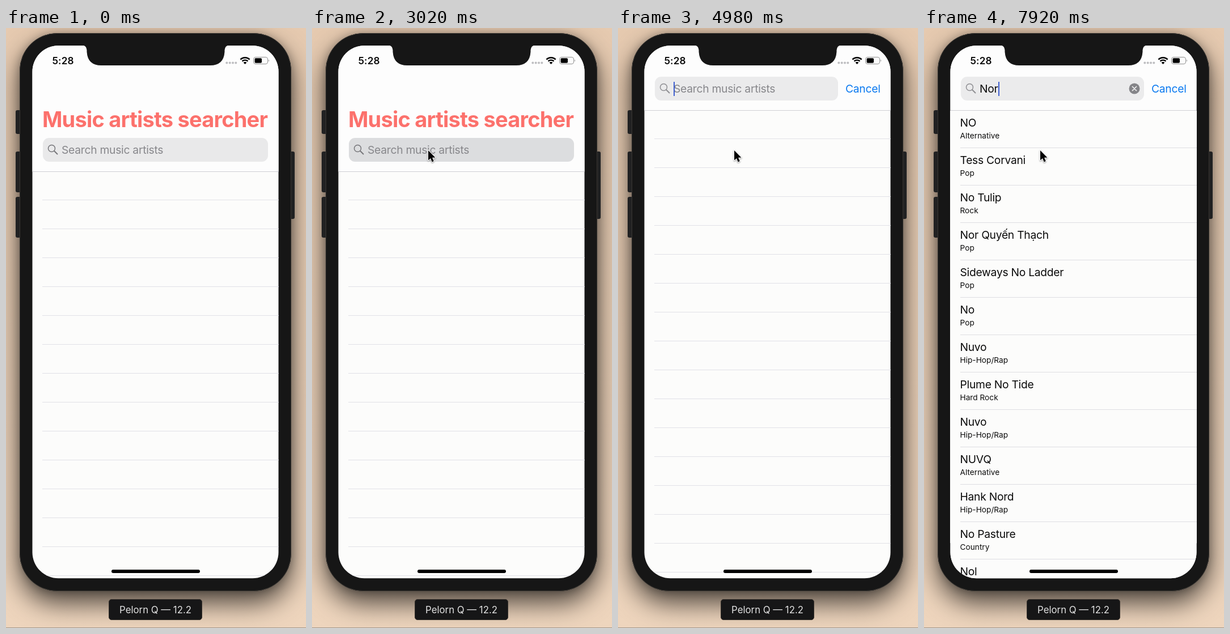
Write an HTML page that moves like this. It is 529 by 1059 pixels and loops after 8 s.

```html
<!DOCTYPE html>
<html lang="en">
<head>
<meta charset="utf-8">
<title>Music artists searcher</title>
<style>
  html, body { margin: 0; width: 100%; height: 100%; overflow: hidden; }
  body {
    position: relative;
    background: linear-gradient(#e6cab0, #eed5bd);
    font-family: Inter, "Noto Sans", sans-serif;
    font-optical-sizing: none;
    color: #0b0b0b;
  }
  div, svg { position: absolute; box-sizing: border-box; }
  .stage { inset: 0 auto auto 0; width: 529px; height: 1059px; overflow: hidden; }
  .text { white-space: nowrap; font-size: 19.3px; letter-spacing: -.28px; line-height: 26px; }

  /* device */
  .body {
    left: 24px; top: 9px; width: 479px; height: 985px; border-radius: 66px;
    background: #161616; border: 1px solid #3a3733;
  }
  .shadow { box-shadow: 0 21px 46px rgba(0, 0, 0, .68), 0 0 15px rgba(0, 0, 0, .24); }
  .key { left: 17px; width: 10px; background: #212122; border-radius: 3px; }
  .key.right { left: 499px; }
  .pop { box-shadow: 5px 0 #212122; animation: pop 8s linear infinite; }
  .screen {
    left: 46px; top: 31px; width: 435px; height: 941px;
    overflow: hidden; background: #fcfcfb;
    clip-path: inset(0 .5px .7px round 46px);
  }
  .view { left: -46px; top: -31px; width: 529px; height: 1059px; }
  .home { left: 186px; top: 956px; width: 156px; height: 6px; border-radius: 3px; background: #000; }
  .clock { left: 81.5px; top: 44.5px; font-size: 17.2px; font-weight: 600; letter-spacing: .1px; }
  .label {
    left: 181px; top: 1008px; width: 165px; height: 37px; border-radius: 5px;
    background: #161617; border: 1px solid #39342f; color: #e2e2e2;
    font-size: 16.8px; line-height: 36px; letter-spacing: 0; text-align: center;
  }
  .floor { left: 0; top: 1058px; width: 529px; height: 1px; background: #a3978a; }

  /* lists */
  .lines {
    left: 64px; top: 303px; width: 420px; height: 820px;
    background: repeating-linear-gradient(#e1e1e7 0 1px, transparent 1px 51px);
    animation: jump 8s step-end infinite;
  }
  .list { left: 46px; top: 146px; width: 435px; height: 830px; background: #fcfcfb; visibility: hidden; }
  .row { left: 18px; width: 420px; height: 66px; border-bottom: 1px solid #dedee2; }
  .row .text { left: -.5px; top: 8px; }
  .row .genre { top: 31px; font-size: 13.7px; letter-spacing: 0; }

  /* header */
  .header {
    left: 46px; top: 31px; width: 435px; height: 223px;
    background: #fdfdfd; border-bottom: 1px solid #cfcfd4;
    animation: rise 8s linear infinite;
  }
  .title {
    left: 18px; top: 105px; line-height: 50px; font-size: 38px; font-weight: 700;
    letter-spacing: -.8px; color: #fc716c; animation: title 8s linear infinite;
  }
  .field {
    left: 19px; top: 163px; width: 397px; height: 42px; border-radius: 11px;
    background: #e9e9ea; animation: field 8s linear infinite;
  }
  .field .text { left: 33px; top: 8px; }
  .lens { animation: lens 8s linear infinite; }
  .hint { color: #87878b; animation: hint 8s linear infinite; }
  .query { display: flex; align-items: center; height: 26px; visibility: hidden; }
  .query i { width: 2px; height: 25px; background: #3f5fd0; }
  .clear { right: 7px; top: 11px; visibility: hidden; animation: clear 8s step-end infinite; }
  .cancel { left: 355px; top: 171px; color: #0a79f0; animation: cancel 8s linear infinite; }

  .cursor {
    left: 0; top: 0; overflow: visible;
    filter: drop-shadow(0 1px 1.2px rgba(0, 0, 0, .4));
    animation: cursor 8s linear infinite;
  }

  @keyframes cursor {
    0%, 17% { transform: translate(-20px, 352px); animation-timing-function: cubic-bezier(.3, .4, .6, 1); }
    20% { transform: translate(192px, 239px); animation-timing-function: ease-out; }
    26.25%, 100% { transform: translate(205px, 216px); }
  }
  @keyframes pop {
    0%, 17.4% { transform: none; }
    18.2%, 21.4% { transform: translateX(-5px); }
    22.5%, 100% { transform: none; }
  }
  @keyframes jump { 39.44%, 100% { transform: translateY(-108px); } }
  @keyframes rise {
    0%, 39.44% { transform: none; animation-timing-function: ease-in-out; }
    43.81%, 100% { transform: translateY(-108px); }
  }
  @keyframes title {
    0%, 39.44% { transform: none; animation-timing-function: ease-in-out; }
    43.81%, 100% { transform: translateY(-50px); }
    0%, 41.25% { opacity: 1; }
    42.9%, 100% { opacity: 0; }
  }
  @keyframes field {
    0%, 29% { background-color: #e9e9ea; }
    30.6%, 41.3% { background-color: #dcdddf; }
    45%, 100% { background-color: #ebebec; }
    0%, 39.44% { width: 397px; animation-timing-function: ease-in-out; }
    43.81%, 100% { width: 323px; }
  }
  @keyframes lens {
    0%, 39.44% { stroke: #76767a; }
    41.25%, 100% { stroke: #8e8e92; }
  }
  @keyframes hint {
    0%, 39.44% { opacity: 1; }
    41.25% { opacity: .7; }
    43.81%, 73.74% { opacity: 1; }
    73.75%, 100% { opacity: 0; }
  }
  @keyframes cancel {
    0%, 39.44% { transform: translateX(75px); opacity: 0; animation-timing-function: ease-in-out; }
    43.81%, 100% { transform: none; opacity: 1; }
  }
  @keyframes clear { 73.75%, 100% { visibility: visible; } }
  @keyframes blink {
    0%, 46.25%, 57%, 67.75%, 73.75%, 100% { visibility: hidden; }
    40%, 50.75%, 61.5%, 72.25% { visibility: visible; }
  }
  @keyframes one { 73.75% { visibility: visible; } 88.75%, 100% { visibility: hidden; } }
  @keyframes two { 88.75% { visibility: visible; } 96.25%, 100% { visibility: hidden; } }
  @keyframes three { 96.25%, 100% { visibility: visible; } }
  @keyframes first { 78.75% { visibility: visible; } 93.75%, 100% { visibility: hidden; } }
  @keyframes second { 93.75%, 100% { visibility: visible; } }
</style>
</head>
<body>
<div class="stage">
  <div class="body shadow"></div>
  <div class="key" style="top:145px;height:42px"></div>
  <div class="key" style="top:218px;height:72px"></div>
  <div class="key pop" style="top:298px;height:72px"></div>
  <div class="key right" style="top:218px;height:119px"></div>
  <div class="body"></div>

  <div class="screen"><div class="view">
    <div class="lines"></div>
    <div class="list" id="first" style="animation:first 8s step-end infinite"></div>
    <div class="list" id="second" style="animation:second 8s step-end infinite"></div>
    <div class="header">
      <div class="text title">Music artists searcher</div>
      <div class="field">
        <svg class="lens" width="30" height="42" fill="none" stroke-width="1.5" stroke-linecap="round">
          <circle cx="15.5" cy="18.5" r="6"/><path d="M20 23l5.5 5.5" stroke-width="1.9"/>
        </svg>
        <div class="text hint">Search music artists</div>
        <div class="text query" style="animation:blink 8s step-end infinite"><i></i></div>
        <div class="text query" style="animation:one 8s step-end infinite">N<i></i></div>
        <div class="text query" style="animation:two 8s step-end infinite">No<i></i></div>
        <div class="text query" style="animation:three 8s step-end infinite">Nor<i></i></div>
        <svg class="clear" width="20" height="20">
          <circle cx="10" cy="10" r="9.5" fill="#848488"/>
          <path d="M6.5 6.5l7 7m0-7l-7 7" stroke="#f4f4f4" stroke-width="1.7" stroke-linecap="round"/>
        </svg>
      </div>
      <div class="text cancel">Cancel</div>
    </div>
    <div class="home"></div>
  </div></div>

  <svg width="529" height="80">
    <path fill="#161616" d="M134 30Q142 31 142.5 39V42Q144 66 168 66H360Q384 66 385.5 42V39Q386 31 394 30Z"/>
    <g fill="#bdbdc0">
      <circle cx="389.3" cy="61.5" r="2"/><circle cx="394.7" cy="61.5" r="2"/>
      <circle cx="400" cy="61.5" r="2"/><circle cx="405.3" cy="61.5" r="2"/>
    </g>
    <path fill="none" stroke="#000" stroke-width="2.4" d="M413.4 55.6a11.5 11.5 0 0 1 16.2 0M416.5 58.7a7.1 7.1 0 0 1 10 0"/>
    <path d="M421.5 64l-2.9-2.9a4.1 4.1 0 0 1 5.8 0z"/>
    <rect x="436.5" y="51.5" width="25" height="12" rx="3.5" fill="none" stroke="#8e8e8e"/>
    <rect x="438.5" y="53.3" width="12.5" height="8.5" rx="1.8"/>
    <path d="M463 55.5q2 2 0 4z" fill="#8e8e8e"/>
  </svg>
  <div class="text clock">5:28</div>

  <div class="text label">Pelorn Q — 12.2</div>
  <div class="floor"></div>
  <svg class="cursor" width="14" height="24">
    <path d="M0 0V17.6L4 13.9L6.7 20.4L9.8 19.1L7.1 12.8H12.5Z" stroke="#fff" stroke-width="2.2" paint-order="stroke" stroke-linejoin="round"/>
  </svg>
</div>
<script>
  const results = {
    first: [
      ["N", "Ambient"], ["N", "K-Pop"], ["\\N", "Electronic"], ["n/", "Alternative"],
      ["Ñ", "Dance"], ["N$", "Hip-Hop/Rap"], ["n/", "Pop"], ["-N", "Electronic"],
      ["N.", "Spoken Word"], ["N", "Alternative"], ["N", "Hip-Hop/Rap"],
      ["nuv", "IDM/Experimental"], ["N≠", ""]
    ],
    second: [
      ["NO", "Alternative"], ["Tess Corvani", "Pop"], ["No Tulip", "Rock"],
      ["Nor Quyến Thạch", "Pop"], ["Sideways No Ladder", "Pop"], ["No", "Pop"],
      ["Nuvo", "Hip-Hop/Rap"], ["Plume No Tide", "Hard Rock"], ["Nuvo", "Hip-Hop/Rap"],
      ["NUVQ", "Alternative"], ["Hank Nord", "Hip-Hop/Rap"], ["No Pasture", "Country"],
      ["Nol", ""]
    ]
  };

  function add(parent, className, text = "") {
    const el = document.createElement("div");
    el.className = className;
    el.textContent = text;
    return parent.appendChild(el);
  }

  for (const [id, rows] of Object.entries(results)) {
    const list = document.getElementById(id);
    rows.forEach(([name, genre], i) => {
      const row = add(list, "row");
      row.style.top = i * 66 + "px";
      add(row, "text", name);
      add(row, "text genre", genre);
    });
  }
</script>
</body>
</html>
```
